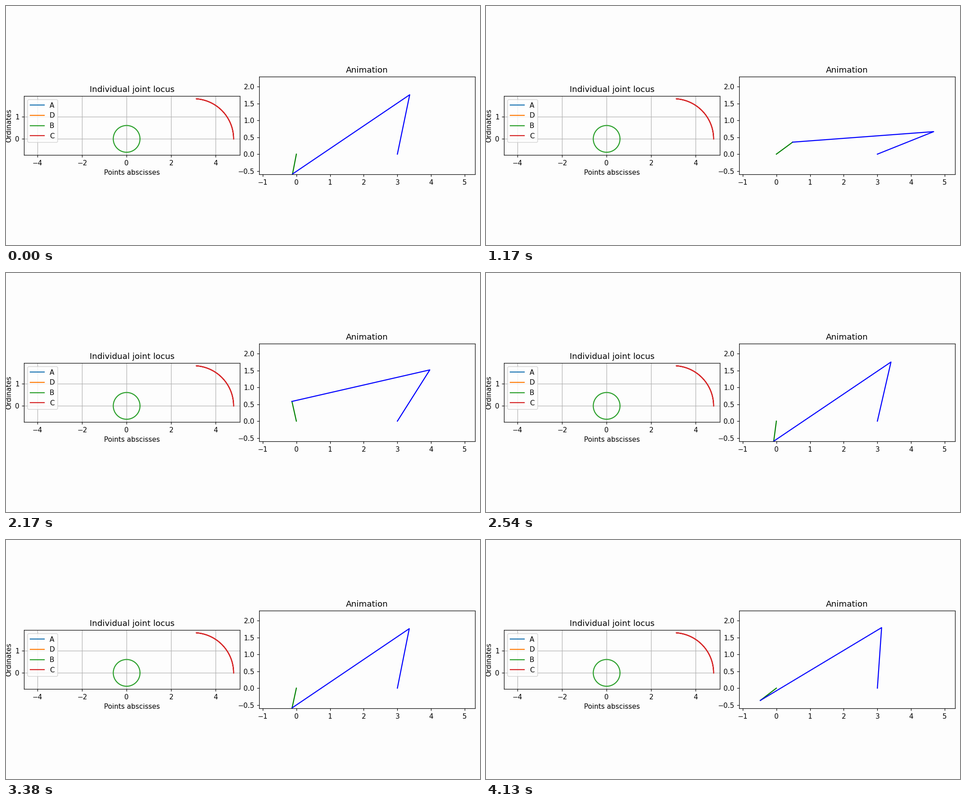
These frames come from a looping animation (1054 px wide and 531 px high, 4180 ms). A matplotlib script:

```python
import numpy as np
import matplotlib.pyplot as plt
from matplotlib.animation import FuncAnimation

W, H, DPI = 1054, 531, 110
LOOP_MS, TICK_MS = 4180, 20
FPS, POSES = 24, 100

# Four-bar linkage: ground AD, crank AB, coupler BC, rocker DC
CRANK, COUPLER, ROCKER = 0.6, 4.2, 1.8
A, D = np.array([0.0, 0.0]), np.array([3.0, 0.0])
START, STEP = np.radians(259.05), 0.31

BG = "#fdfdfd"


def linkage(theta):
    """Positions of joints B and C for a crank angle."""
    b = A + CRANK * np.array([np.cos(theta), np.sin(theta)])
    span = D - b
    dist = np.hypot(*span)
    along = (COUPLER**2 - ROCKER**2 + dist**2) / (2 * dist)
    off = np.sqrt(max(COUPLER**2 - along**2, 0))
    u = span / dist
    return b, b + along * u + off * np.array([-u[1], u[0]])


def add_axes(left, xlim, ylim, width=479.2):
    """Equal-aspect axes, centred vertically on the stage."""
    height = width * (ylim[1] - ylim[0]) / (xlim[1] - xlim[0])
    ax = fig.add_axes([left / W, 0.5 - height / 2 / H, width / W, height / H])
    ax.set(xlim=xlim, ylim=ylim, facecolor=BG)
    return ax


fig = plt.figure(figsize=((W + 0.001) / DPI, (H + 0.001) / DPI), dpi=DPI,
                 facecolor=BG)

locus = add_axes(40.3, (-4.6, 5.07), (-0.72, 1.92))
path = np.array([linkage(t) for t in np.linspace(0, 2 * np.pi, 361)])
locus.plot(*A, label="A")
locus.plot(*D, label="D")
locus.plot(*path[:, 0].T, label="B")
locus.plot(*path[:, 1].T, label="C")
locus.set(title="Individual joint locus", xlabel="Points abscisses",
          ylabel="Ordinates", xticks=range(-4, 5, 2), yticks=[0, 1])
locus.grid()
locus.legend(loc="upper left")

stage = add_axes(563.3, (-1.1, 5.3), (-0.6, 2.3))
stage.set(title="Animation", xticks=range(-1, 6),
          yticks=np.arange(-0.5, 2.1, 0.5))
crank, = stage.plot([], [], "g")
bars, = stage.plot([], [], "b")


def update(k):
    # Poses change at 24 per second, rounded to 10 ms
    t = k * TICK_MS + TICK_MS // 2
    pose = min(((t + 5) * FPS - 1) // 1000, POSES - 1)
    b, c = linkage(START + STEP * pose)
    crank.set_data(*np.array([A, b]).T)
    bars.set_data(*np.array([b, c, D]).T)
    return crank, bars


anim = FuncAnimation(fig, update, frames=LOOP_MS // TICK_MS,
                     interval=TICK_MS, repeat=True, repeat_delay=0)
plt.show()
```
